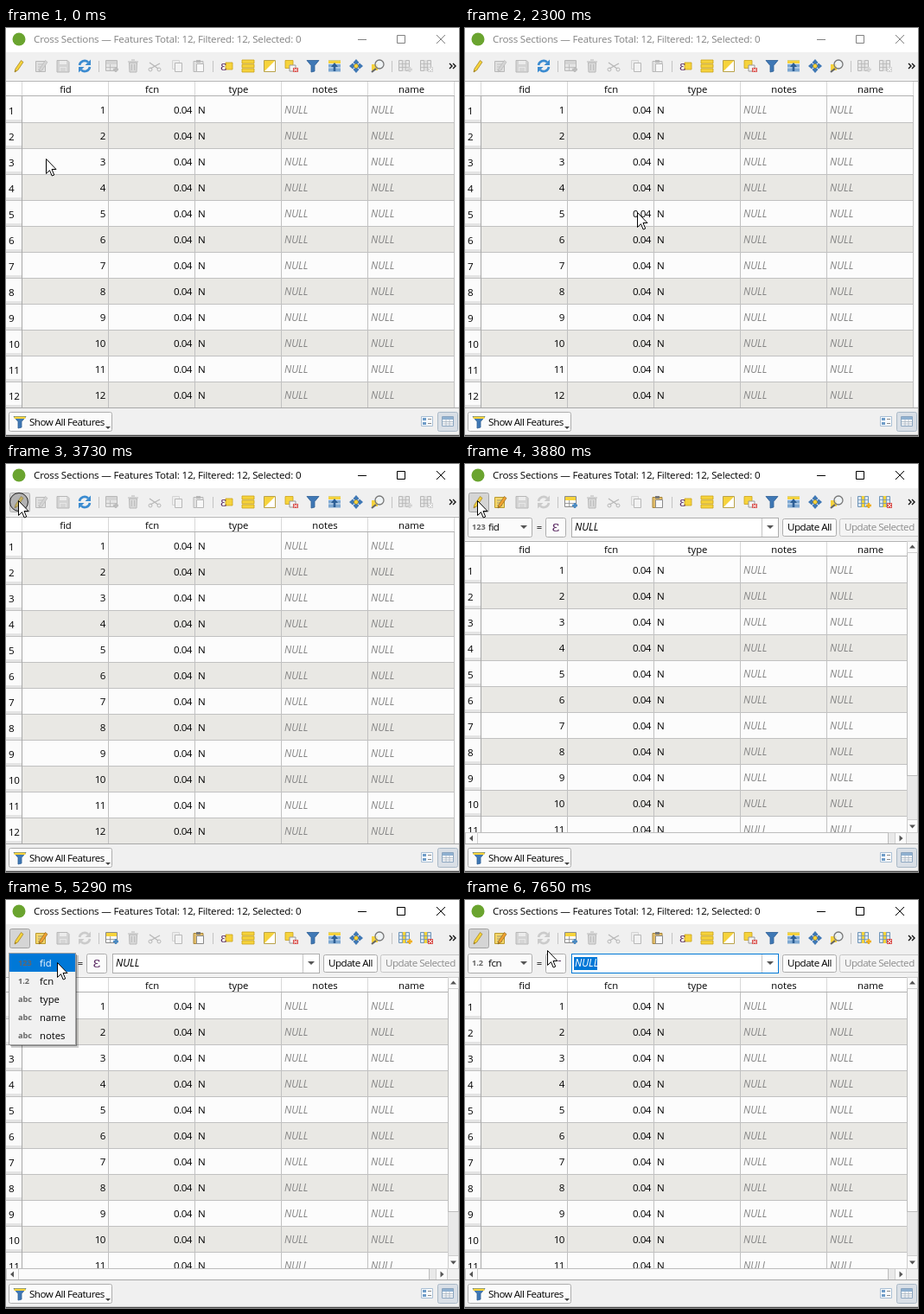
These frames come from a looping animation (524 by 472 pixels, 8000 ms). An HTML page:

```html
<!DOCTYPE html>
<html lang="en">
<head>
<meta charset="utf-8">
<title>Attribute table</title>
<style>
html, body { margin: 0; width: 100%; height: 100%; overflow: hidden; background: #f0f0f0; }
svg { display: block; }
text { font: 11.3px "Open Sans", "Noto Sans", sans-serif; fill: #000; white-space: pre; }
.ui { font-size: 11.6px; letter-spacing: -.5px; }
.title { font-size: 11.6px; letter-spacing: -.18px; }
.null { font-size: 11.7px; font-style: italic; fill: #858585; }
.tag { font-size: 9.2px; font-weight: 700; fill: #666; }
.mid { text-anchor: middle; }
.end { text-anchor: end; }
.eps { font: 17px "DejaVu Serif", "Noto Serif", serif; fill: #5b2a63; }
</style>
</head>
<body>
<svg id="stage" width="524" height="472" viewBox="0 0 524 472"></svg>
<script>
const LOOP = 8000;
const YELLOW = '#f6d33c', BLUE = '#3f78b5', GREY = '#d4d4d4', DIM = '#b8b8b8', RED = '#d9534f';

const text = (x, y, s, cls = 'ui', extra = '') => `<text x="${x}" y="${y}" class="${cls}" ${extra}>${s}</text>`;
const fill = (x, y, w, h, c) => `<rect x="${x}" y="${y}" width="${w}" height="${h}" fill="${c}"/>`;
const box = (x, y, w, h, c, line = '#adadad', r = 0) =>
  `<rect x="${x + .5}" y="${y + .5}" width="${w - 1}" height="${h - 1}" rx="${r}" fill="${c}" stroke="${line}"/>`;
const path = (d, c = 'none', line = 'none', w = 1) => `<path d="${d}" fill="${c}" stroke="${line}" stroke-width="${w}"/>`;
const during = (from, to, body) => `<g data-on="${from},${to}">${body}</g>`;
const at = (x, y, body) => `<g transform="translate(${x} ${y})">${body}</g>`;
const range = n => Array.from({ length: n }, (_, i) => i);

function titleBar(c) {
  return text(32, 17, 'Cross Sections — Features Total: 12, Filtered: 12, Selected: 0', 'title', `style="fill:${c}"`) +
    path('M407 13.5h10M452.5 8.5h9v9h-9zM498 8l10 10M508 8l-10 10', 'none', c);
}

// Icon parts, each drawn around its own centre
const pencil = (c, line) => path('M-5 7-4 3 2.5-6.5 5-4.5-1.5 5Z', c, line, .7) + path('M-5 7-4.4 4.5-3 5.7Z', line);
const sheet = (c, line) => path('M-7.5-6.5h13v12h-13z', c, line) + path('M-7-2.5h12M-7 1.5h12M-2.5-6v11', 'none', line, .8);
const funnel = path('M-7-6.5H7L2-.5V6L-2 7V-.5Z', BLUE, '#2d5f96', .8);
const list = path('M-7-7H7V-3H-7ZM-7-2H7V2H-7ZM-7 3H7V7H-7Z', YELLOW, '#c9a21a', .8);
const columns = (c, line, sun) => path('M-7.5-6.5h12v12h-12z', c, line) +
  fill(-3.5, -7, 4, 13, sun) + path('M-3.5-6.5V5.5M.5-6.5V5.5M-7-2.5H4M-7 1.5H4', 'none', line, .8);

function refresh(c) {
  return path('M-6-1A6 6 0 0 1 4-4.5M6 1A6 6 0 0 1-4 4.5', 'none', c, 2.6) +
    path('M7-7.5V-1H.5ZM-7 7.5V1H-.5Z', c);
}

function toolbar(edit) {
  const pick = (a, b) => edit ? a : b;
  const line = pick('#8a8a8a', DIM), sun = pick(YELLOW, '#dedede');
  const blueLine = pick('#6f94b8', DIM), paper = pick('#dbe7f2', '#e6e6e6');
  const icons = [
    [15, pencil(YELLOW, '#9a7a1c')],
    [41, path('M-6.5-5.5h11v12h-11z', pick('#f5d76a', '#e0e0e0'), pick('#b99a30', DIM)) +
      path('M-4-2h6M-4 1h6M-4 4h6', 'none', line, .8) + at(2, 0, pencil(pick('#f0a030', GREY), pick('#8f6a20', DIM)))],
    [66, path('M-7-6.5H5L7-4.5V7H-7Z', GREY, DIM) + fill(-4, -6, 8, 4, '#ececec') + fill(-4, 1, 8, 5, '#e6e6e6') +
      path('M-3 3h6M-3 5h6', 'none', DIM, .7)],
    [91, refresh(pick('#cbcbcb', '#3b8bd0'))],
    [123, sheet(pick('#fff', '#e4e4e4'), line) + fill(-7, -6, 12, 4, pick(YELLOW, GREY)) +
      path('M4 1v6M1 4h6', 'none', pick('#4b8bc4', '#bdbdbd'), 2.4)],
    [147, path('M-4.5-4h9L4 7h-8z', '#dadada', DIM) + path('M-6-5H6M-2-7h4M-1.7-2v7M1.7-2v7', 'none', DIM)],
    [172, path('M-6-4 4 3M-5 3 6-3', 'none', DIM, 1.4) +
      '<circle cx="-5" cy="4" r="2" fill="none" stroke="#b8b8b8"/><circle cx="5" cy="4" r="2" fill="none" stroke="#b8b8b8"/>'],
    [198, path('M-5.5-6.5h8v10h-8z', '#ececec', GREY) + path('M-2.5-3.5h8v10h-8z', '#f2f2f2', DIM)],
    [223, path('M-6-5.5H5V6.5H-6z', pick('#e2bd6a', '#e2e2e2'), pick('#a8873c', DIM)) +
      fill(-3, -7, 5, 3, pick('#777', DIM)) + path('M-2.5-2.5h8v9h-8z', '#f8f8f8', line)],
    [255, fill(-1, -4, 8, 8, YELLOW) + path('M-1-4h8v8h-8z', 'none', '#c9a21a', .8) + text(-7, 5, 'ε', 'eps', 'style="font-size:14px"')],
    [280, list],
    [305, path('M-6.5-6.5h13v13h-13z', '#fff', '#b9a24a') + path('M-6-6H6L-6 6Z', YELLOW)],
    [330, path('M-7-6.5h9v9h-9z', YELLOW, '#c9a21a', .8) + path('M-2-1h7v7h-7z', '#f3f3f3', '#999') +
      fill(2, 2, 6, 5, RED) + path('M3 3l4 3M7 3l-4 3', 'none', '#fff')],
    [355, funnel],
    [380, fill(-7, -6.5, 14, 13, '#7fa9d2') + fill(-7, -6.5, 14, 4, YELLOW) +
      path('M-7-2.5H7M-7 2H7', 'none', '#d8e6f3') + path('M0-4 4 1H1.3V6h-2.6V1H-4Z', '#2d5f96')],
    [405, path('M0-8 3.5-4 0-1-3.5-4ZM0 8 3.5 4 0 1-3.5 4ZM-8 0-4 3.5-1 0-4-3.5ZM8 0 4 3.5 1 0 4-3.5Z', BLUE) +
      path('M0-3 3 0 0 3-3 0Z', YELLOW, '#8b7a2a', .7)],
    [430, fill(-7, -2, 7, 7, YELLOW) + path('M-2 3l-5 4', 'none', '#666', 2.2) +
      '<circle cx="2" cy="-2" r="5" fill="#eef3f6" fill-opacity=".75" stroke="#777" stroke-width="1.3"/>'],
    [462, columns(paper, blueLine, sun) + path('M5 1v6M2 4h6', 'none', pick('#f0b020', GREY), 2.4)],
    [487, columns(paper, blueLine, sun) + fill(1, 1, 6, 6, pick(RED, GREY)) +
      path('M2 2l4 4M6 2l-4 4', 'none', '#fff')]
  ];
  return (edit ? box(4, 33, 24, 23, '#d5d5d5', '#a2a2a2', 2) : '') +
    icons.map(([x, body]) => at(x, 44, body)).join('') +
    [107, 239, 446].map(x => path(`M${x}.5 38v13`, 'none', '#c4c4c4')).join('') +
    path('M513 41l3 3-3 3M517 41l3 3-3 3', 'none', '#111', 1.4);
}

function table() {
  const names = ['fid', 'fcn', 'type', 'notes', 'name'];
  let s = fill(0, 60, 524, 380, '#fff');
  for (const i of range(12)) {
    const y = 80 + i * 30;
    s += fill(19, y, 500, 29, i % 2 ? '#e9e8e4' : '#fcfcfc') +
      fill(0, y, 18, 30, '#fbfbfb') + fill(0, y + 26, 18, 3, '#e4e4e4') +
      path(`M0 ${y + 29.5}H519`, 'none', '#c1c1c1') +
      text(3, y + 20, i + 1) + text(115, y + 19, i + 1, 'ui end') +
      text(215, y + 19, '0.04', 'ui end') + text(222, y + 19, 'N') +
      text(322, y + 19, 'NULL', 'null') + text(422, y + 19, 'NULL', 'null');
  }
  s += names.map((n, i) => text(69 + i * 100, 75, n, 'mid') +
    path(`M${118.5 + i * 100} 62V79`, 'none', '#d8d8d8') +
    path(`M${118.5 + i * 100} 79V440`, 'none', '#c1c1c1')).join('');
  return s + path('M18.5 62V79', 'none', '#d8d8d8') + path('M18.5 79V440', 'none', '#a8a8a8') +
    path('M0 61.5H524M0 78.5H519', 'none', '#b0b0b0');
}

function scrollBars() {
  return fill(511, 88, 13, 352, '#f0f0f0') + fill(0, 426, 511, 14, '#f0f0f0') +
    box(511, 89, 13, 338, '#e9e9e9', '#cecece') + box(511, 102, 13, 259, '#fbfbfb', '#bdbdbd') +
    box(511, 89, 13, 14, '#fbfbfb', '#cecece') + box(511, 411, 13, 16, '#fbfbfb', '#cecece') +
    box(0, 426, 511, 14, '#e9e9e9', '#cecece') + box(14, 426, 476, 14, '#fbfbfb', '#bdbdbd') +
    box(0, 426, 15, 14, '#fbfbfb', '#cecece') + box(497, 426, 14, 14, '#fbfbfb', '#cecece') +
    path('M514 97.5h7l-3.5-4zM514 417.5h7l-3.5 4zM9 429.5v7l-4-3.5zM502.5 429.5v7l4-3.5z', '#555');
}

const caret = (x, y) => path(`M${x - 4} ${y - 2}h8l-4 4z`, '#555');

function fieldBar() {
  const value = c => text(127, 77, 'NULL', 'null', `style="fill:${c}"`);
  return fill(0, 57, 524, 31, '#f0f0f0') +
    box(3, 62, 75, 23, '#fbfbfb', '#adadad', 2) +
    during(4850, 5290, box(3, 62, 75, 23, '#e5f1fb', '#0078d7', 2)) +
    during(0, 6350, text(8, 76, '123', 'tag') + text(27, 77, 'fid')) +
    during(6350, LOOP, text(8, 76, '1.2', 'tag') + text(27, 77, 'fcn')) + caret(68, 73) +
    text(86, 77, '=', 'mid') +
    box(93, 62, 24, 23, '#fbfbfb', '#adadad', 2) +
    during(0, 7650, text(105, 78, 'ε', 'eps mid')) +
    during(7650, LOOP, fill(108, 70, 3, 1, '#5b3a63')) +
    box(123, 62, 240, 23, '#fff') +
    during(6740, LOOP, box(123, 62, 240, 23, '#fff', '#777')) +
    during(7110, LOOP, box(123, 62, 240, 23, '#fff', '#0078d7') + fill(126, 66, 27, 15, '#0078d7')) +
    path('M343.5 63v21', 'none', '#c4c4c4') + caret(353, 73) +
    during(0, 7110, value('#000')) + during(7110, LOOP, value('#fff')) +
    box(367, 63, 63, 21, '#fbfbfb', '#adadad', 2) + text(373, 77, 'Update All') +
    box(433, 63, 94, 21, '#f4f4f4', '#c6c6c6', 2) + text(439, 77, 'Update Selected', 'ui', 'style="fill:#8c8c8c"');
}

function menu() {
  const items = [['123', 'fid'], ['1.2', 'fcn'], ['abc', 'type'], ['abc', 'name'], ['abc', 'notes']];
  const row = ([tag, name], i, c) => text(14, 76 + i * 21, tag, 'tag') +
    text(39, 77 + i * 21, name, '', `style="fill:${c}"`);
  const lit = i => fill(4, 62 + i * 21, 76, 21, '#0078d7') + row(items[i], i, '#fff');
  return fill(6, 64, 78, 107, 'rgba(0,0,0,.18)') + fill(5, 63, 77, 106, 'rgba(0,0,0,.35)') +
    box(3, 61, 78, 107, '#f1f1f1', '#a0a0a0') + items.map((it, i) => row(it, i, '#000')).join('') +
    during(5290, 5680, lit(0)) + during(5680, 6350, lit(1));
}

function footer() {
  return fill(0, 440, 524, 32, '#f0f0f0') + path('M0 439.5H524', 'none', '#a8a8a8') +
    box(3, 444, 120, 23, '#fbfbfb', '#adadad', 2) +
    at(16, 456, funnel + fill(-6.5, -6.5, 13, 2.5, YELLOW)) +
    text(27, 460, 'Show All Features') + path('M115 461h6l-3 3z', '#444') +
    at(487, 455, path('M-6.5-5.5h13v11h-13z', '#f8fafc', '#a9bfd4') + fill(-5, -4, 4, 3, '#6f9cc8') +
      fill(-5, 1, 4, 3, '#6f9cc8') + path('M1-2.5h4M1 2.5h4', 'none', '#8a8a8a')) +
    box(499, 444, 24, 23, '#d9dfe6', '#a9b8c6', 2) +
    at(511, 455, path('M-6.5-5.5h13v11h-13z', '#f8fafc', '#8ba5bf') + fill(-6, -5, 12, 3, '#8fb0d0') +
      path('M-6 .5H6M-6 3H6M-2-2V5M2-2V5', 'none', '#a9b4bf', .8)) +
    fill(0, 470, 524, 1, '#c9c9c9') + fill(0, 471, 524, 1, '#4a4a4a');
}

const click = (x, y) => `<circle cx="${x}" cy="${y}" r="10.5" fill="#888" fill-opacity=".45" stroke="#222"/>`;

// Pointer stops: time, x, y
const stops = [
  [0, 46, 151], [150, 72, 191], [300, 73, 193], [450, 270, 211], [580, 406, 218],
  [730, 358, 220], [860, 334, 219], [1000, 308, 226], [1125, 290, 231], [1250, 279, 233],
  [2300, 199, 213], [2450, 118, 143], [2570, 51, 83], [2720, 27, 54], [2850, 11, 34],
  [3000, 13, 39], [3150, 12, 41], [3270, 14, 42], [4570, 12, 51], [4720, 42, 68],
  [4850, 61, 77], [4990, 61, 78], [5140, 59, 72], [5550, 55, 86], [5680, 51, 98],
  [6620, 98, 82], [6740, 148, 73], [6860, 170, 72], [7260, 116, 60], [7380, 90, 51],
  [7530, 116, 60], [7650, 95, 58]
];

const stage = document.getElementById('stage');
stage.innerHTML =
  '<defs><clipPath id="view"><rect y="88" width="511" height="338"/></clipPath></defs>' +
  fill(0, 0, 524, 472, '#f0f0f0') + fill(0, 0, 524, 28, '#fff') +
  '<circle cx="15" cy="13" r="7.5" fill="#6aa42f"/>' +
  during(0, 3730, titleBar('#828282')) + during(3730, LOOP, titleBar('#000')) +
  during(2850, 3730, box(4, 33, 24, 23, '#e3e3e3', '#b8b8b8', 2)) +
  during(3730, 3880, box(4, 33, 24, 23, '#d5d5d5', '#b0b0b0', 2)) +
  during(0, 3880, toolbar(false) + table()) +
  during(3880, LOOP, toolbar(true) + fieldBar() +
    `<g clip-path="url(#view)">${at(0, 28, table())}</g>` + scrollBars()) +
  footer() +
  during(5290, 6350, menu()) +
  during(3730, 3880, click(15, 44)) + during(6080, 6200, click(52.5, 99.5)) +
  '<g id="pointer">' +
  '<g id="arrow">' + path('M.5.5V17.5L4.5 13.7 7.2 20 9.7 19 7 12.5H12Z', '#fff', '#000') + '</g>' +
  '<g id="beam">' + path('M-3-8.5h2.5l.5.5.5-.5H3M0-8V8M-3 8.5h2.5L0 8l.5.5H3', 'none', '#000') + '</g></g>';

const timed = [...stage.querySelectorAll('[data-on]')].map(el => [el, ...el.dataset.on.split(',').map(Number)]);
const [pointer, arrow, beam] = ['pointer', 'arrow', 'beam'].map(id => document.getElementById(id));
const show = (el, on) => { el.style.display = on ? '' : 'none'; };

function render(t) {
  for (const [el, from, to] of timed) show(el, t >= from && t < to);
  const [, x, y] = stops.findLast(s => s[0] <= t);
  pointer.setAttribute('transform', `translate(${x} ${y})`);
  const typing = t >= 6740 && t < 7260;
  show(arrow, !typing);
  show(beam, typing);
}

let start;
function tick(now) {
  start ??= now;
  render(Math.max(0, now - start) % LOOP);
  requestAnimationFrame(tick);
}
render(0);
requestAnimationFrame(tick);
</script>
</body>
</html>
```
